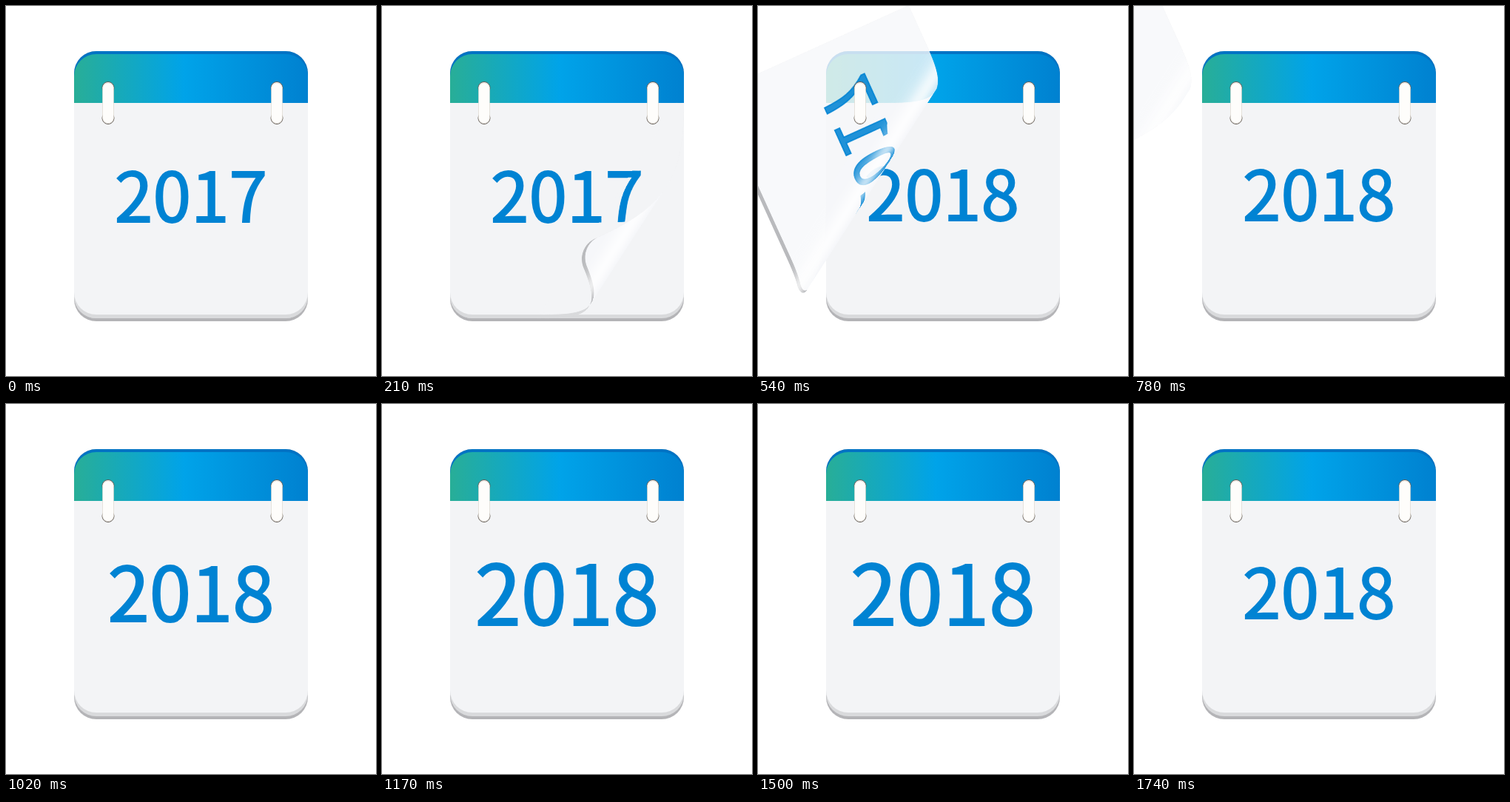
These frames come from a looping animation (500 by 500 pixels, 1.8 s). An HTML page with a canvas:

```html
<!DOCTYPE html>
<html lang="en">
<head>
<meta charset="utf-8">
<title>Calendar page turn</title>
<style>
  html, body { margin: 0; width: 100%; height: 100%; overflow: hidden; background: #fff; }
  canvas { display: block; width: 500px; height: 500px; }
</style>
</head>
<body>
<canvas id="stage"></canvas>
<script>
const LOOP = 1800, STEP = 30;
const BLUE = '#0083d3', FACE = '#f3f4f6', RIM = '#d9dadc';
const LEFT = 92, WIDTH = 316, SHEET_TOP = 131;

// Page curl: a cylinder rolling along the axis u, with v along the fold.
const ANGLE = 32.8 * Math.PI / 180, COS = Math.cos(ANGLE), SIN = Math.sin(ANGLE);
const R = 50, Q = 2, V0 = -120, U_SIZE = 620, V_SIZE = 440;

const K = window.devicePixelRatio || 1;
const stage = document.getElementById('stage');
stage.width = stage.height = 500 * K;
const ctx = stage.getContext('2d');

function box(g, top, bottom, radii, fill) {
  g.beginPath();
  g.roundRect(LEFT, top, WIDTH, bottom - top, radii);
  g.fillStyle = fill;
  g.fill();
}

function year(g, text, baseline) {
  g.font = '400 93px "Noto Sans CJK SC", "Noto Sans CJK JP", "Noto Sans CJK", "Noto Sans", sans-serif';
  g.textAlign = 'center';
  g.fillStyle = g.strokeStyle = BLUE;
  g.lineWidth = 1.8;
  g.lineJoin = 'miter';
  g.miterLimit = 3;
  g.fillText(text, 250, baseline);
  g.strokeText(text, 250, baseline);
}

const ROUND_BOTTOM = [0, 0, 30, 30];

function frontSheet(g) {
  box(g, SHEET_TOP, 422, ROUND_BOTTOM, RIM);
  box(g, SHEET_TOP, 417, ROUND_BOTTOM, FACE);
  year(g, '2017', 291.6);
}

function backSheet(g) {
  box(g, SHEET_TOP, 422, ROUND_BOTTOM, '#b9babd');
  g.globalCompositeOperation = 'destination-out';
  box(g, SHEET_TOP, 417, ROUND_BOTTOM, '#000');
  g.globalCompositeOperation = 'source-over';
  box(g, SHEET_TOP, 417, ROUND_BOTTOM, 'rgba(247,248,250,.81)');
  g.globalAlpha = 0.87;
  year(g, '2017', 291.6);
}

function glossSheet(g) {
  box(g, SHEET_TOP, 422, ROUND_BOTTOM, '#fff');
}

// Canvas in fold-aligned coordinates.
function layer(draw) {
  const c = document.createElement('canvas');
  c.width = U_SIZE * Q;
  c.height = V_SIZE * Q;
  if (draw) {
    const g = c.getContext('2d');
    g.setTransform(Q * COS, -Q * SIN, Q * SIN, Q * COS, 0, -Q * V0);
    draw(g);
  }
  return c;
}

const front = layer(frontSheet), back = layer(backSheet), gloss = layer(glossSheet);
const curl = layer(), cg = curl.getContext('2d');

function column(src, col, u, width, alpha) {
  const w = Math.max(1, width * Q), x = u * Q - w / 2;
  if (x < 0 || x + w > src.width) return;
  cg.globalAlpha = alpha;
  cg.drawImage(src, x, 0, w, src.height, col, 0, 1, src.height);
}

function drawCurl(contact) {
  cg.clearRect(0, 0, curl.width, curl.height);
  const last = Math.min(curl.width, Math.floor((contact + R) * Q));
  for (let col = 0; col < last; col++) {
    const x = (col + 0.5) / Q, s = (x - contact) / R;
    if (s <= 0) {
      column(back, col, 2 * contact + Math.PI * R - x, 1 / Q, 1);
    }
    if (s > 0) {
      const a = Math.asin(Math.min(s, 1));
      const w = Math.min(4, 1 / Q / Math.max(Math.cos(a), 0.05));
      column(front, col, contact + R * a, w, 1);
      const turn = Math.PI - a, u = contact + R * turn;
      column(back, col, u, w, 1);
      column(gloss, col, u, w, 0.72 * Math.exp(-(((turn - 2.3) / 0.34) ** 2)));
    }
  }
  ctx.save();
  ctx.transform(COS, SIN, -SIN, COS, 0, 0);
  ctx.drawImage(curl, 0, V0, U_SIZE, V_SIZE);
  ctx.restore();
}

function drawSheet(t) {
  if (t === 0) return frontSheet(ctx);
  const contact = 527 - 0.58 * Math.min(t, 780);
  ctx.save();
  ctx.beginPath();
  ctx.save();
  ctx.transform(COS, SIN, -SIN, COS, 0, 0);
  ctx.rect(-600, -800, 600 + contact + 0.5, 1600);
  ctx.restore();
  ctx.clip();
  frontSheet(ctx);
  ctx.restore();
  drawCurl(contact);
}

const header = ctx.createLinearGradient(LEFT, 0, LEFT + WIDTH, 0);
header.addColorStop(0, '#28ae97');
header.addColorStop(0.47, '#00a3e9');
header.addColorStop(1, '#0081d0');

function drawBase() {
  box(ctx, 61, 426, 30, '#b4b4b7');
  box(ctx, 100, 422, ROUND_BOTTOM, RIM);
  box(ctx, 100, 417, ROUND_BOTTOM, FACE);
  box(ctx, 61, SHEET_TOP, [30, 30, 0, 0], '#0073c4');
  box(ctx, 65, SHEET_TOP, [30, 30, 0, 0], header);
}

function drawRing(x) {
  ctx.lineWidth = 1;
  for (const y of [110.5, 151.5]) {
    ctx.beginPath();
    ctx.arc(x, y, 8, 0, 7);
    ctx.fillStyle = '#fff';
    ctx.fill();
    ctx.strokeStyle = '#5b544e';
    ctx.stroke();
  }
  ctx.beginPath();
  ctx.roundRect(x - 7.5, 104, 15, 54.5, 7.5);
  ctx.fillStyle = '#fefdfb';
  ctx.fill();
  ctx.lineWidth = 0.6;
  ctx.strokeStyle = '#d8d2c8';
  ctx.stroke();
}

function pulse(t) {
  if (t <= 900) return 0;
  return t < 1350 ? (t - 900) / 450 : Math.max(0, (1740 - t) / 390);
}

function drawNewYear(t) {
  const p = pulse(t), s = 1 + 0.34 * p;
  ctx.save();
  ctx.translate(250.3, 255.4 + 3 * p);
  ctx.scale(s, s);
  ctx.translate(-250.3, -255.4);
  year(ctx, '2018', 290);
  ctx.restore();
}

function render(t) {
  ctx.setTransform(K, 0, 0, K, 0, 0);
  ctx.fillStyle = '#fff';
  ctx.fillRect(0, 0, 500, 500);
  drawBase();
  drawNewYear(t);
  if (t < 930) drawSheet(t);
  drawRing(138);
  drawRing(366);
}

const start = performance.now();
let shown = -1;
function tick() {
  const t = Math.floor((performance.now() - start) % LOOP / STEP) * STEP;
  if (t !== shown) render(shown = t);
  requestAnimationFrame(tick);
}
tick();
</script>
</body>
</html>
```
